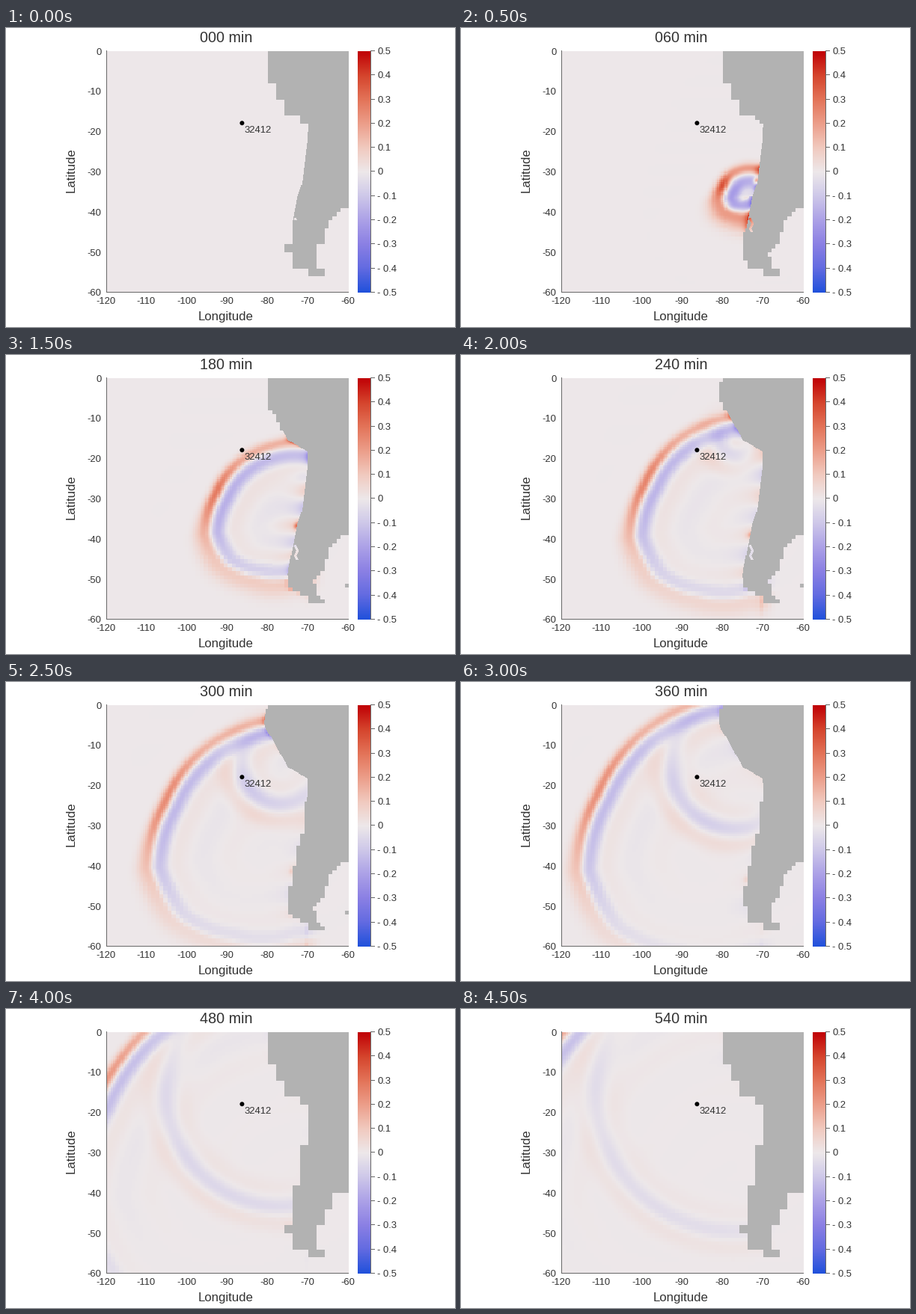
These frames come from a looping animation (600x400 px, 4750 ms). A matplotlib script:

```python
import numpy as np
import matplotlib.pyplot as plt
from matplotlib.animation import FuncAnimation
from matplotlib.colors import LinearSegmentedColormap
from matplotlib.patches import Circle

plt.rcParams["font.family"] = "Liberation Sans"
W, H, DPI = 600, 400, 100
LEFT, TOP, SIDE = 135, 31, 323
RIGHT, BOTTOM = LEFT + SIDE, TOP + SIDE
FRAMES, STEP = 19, 30  # minutes of model time per frame
PX = 72 / DPI
INK, AXIS = "#333333", "#686868"
LAND = np.array([178, 178, 178]) / 255

CMAP = LinearSegmentedColormap.from_list("sea", [
    "#2151db", "#636be1", "#8b80e4", "#aca1e7", "#cec8e9", "#ede8ea",
    "#f1cabf", "#ec9e8a", "#e37459", "#d5452d", "#c00206"], N=512)

# Key points of the two coasts as (latitude, longitude).
WEST = [(0, -80.4), (-4.5, -81), (-6, -80.6), (-7.5, -79.5), (-12, -77),
        (-15.5, -75), (-17, -72.2), (-18.2, -70.3), (-22, -70.2),
        (-29, -71.1), (-33, -71.6), (-36, -72.7), (-42, -73.9),
        (-47, -74.9), (-49, -75.2), (-53, -74.4), (-54, -70.4)]
EAST = [(-38, -59.5), (-39.5, -61.5), (-41.2, -64.2), (-44.5, -65),
        (-46, -66.6), (-47.5, -66.2), (-50.5, -68.6), (-53.5, -68),
        (-56, -66)]

CELL = 0.2
lat_axis = -CELL * (np.arange(300) + .5)
LON, LAT = np.meshgrid(-120 + CELL * (np.arange(300) + .5), lat_axis)


def bell(d, width):
    return np.exp(-.5 * (d / width) ** 2)


def sigmoid(x):
    return 1 / (1 + np.exp(-np.clip(x, -50, 50)))


def snap(v, size):
    """Centre of the grid cell that holds v."""
    return (np.floor(v / size + 1e-6) + .5) * size


def coast(points, lat):
    lats, lons = np.array(points, float).T
    return np.interp(-lat, -lats, lons)


def bands(t):
    """Limits of the refined rows: fine north/south, medium north/south."""
    if t > 450:
        return 0, 0, 0, 0
    keys = [0, 120, 240, 300, 420, 450]
    limits = ([-20, -18, -8, -1, -7, -9], [-42, -48, -50, -24, -15, -9],
              [-20, -14, 0, 0, 0, -4], [-44, -60, -60, -60, -40, -38])
    return [np.interp(t, keys, limit) for limit in limits]


def between(lat, north, south):
    return (lat < north) & (lat > south)


def land_mask(t):
    fine_n, fine_s, med_n, med_s = bands(t)
    fine = between(lat_axis, fine_n, fine_s)
    medium = between(lat_axis, med_n, med_s)
    size = np.where(fine, CELL, np.where(medium, 1, 2))

    def edge(points, size):
        return np.round(coast(points, snap(lat_axis, size)) / size) * size

    west = edge(WEST, size)[:, None]
    east = edge(EAST, np.maximum(size, 1))[:, None]
    land = (LON > west) & (LON < east) & (LAT > -56)
    # sheltered sound behind the southern islands
    sound = fine[:, None] & between(LAT, -41.4, -45.2)
    land &= ~(sound & (abs(LON + 73 - .25 * np.sin(LAT * 2.6)) < .32))
    if med_s == -60:
        land |= (LON > -61) & between(LAT, -51, -52)
    return land


def main_wave(t, lon, lat):
    dx, dy = lon + 73.5, lat + 36
    ang = np.degrees(np.arctan2(dy, -dx))  # 0 west, 90 north
    reach = np.interp(t, [0, 120, 240, 300, 420, 540],
                      [.4, 13.8, 27.7, 34.2, 46, 59.2])
    reach = reach * np.interp(ang, [-90, -55, -30, -7, 20, 75],
                              [.69, .84, 1.02, 1.075, 1, .965])
    s = np.hypot(dx, dy) - reach

    amp = min(t / 30, 1) * (.22 + .25 * np.exp(-t / 150))
    southward = sigmoid(-(ang + 15) / 9)
    fade = 1 - southward * (1 - min(1, 1.55 * np.exp(-t / 180)))
    crest = .55 + .45 * bell(ang - 22, 15)
    trough = .4 + .16 * bell(ang - 10, 40)
    width = np.where(s > 0, 1 + 1.4 * sigmoid(-(ang + 5) / 8), 1)
    wave = crest * bell(s, width) - trough * bell(s + 3.2, 1.35)
    tail = np.minimum(s + 5, 0)
    wave += .1 * np.exp(tail / 12) * np.cos(2 * np.pi * (s + 7.5) / 13.5) * (tail < 0)

    # bands along the shore, left behind by the front
    shore = coast(WEST, lat) - lon
    mid = -30 - .037 * t
    ripple = np.cos(2 * np.pi * (lat - mid) / (4 + t / 40))
    decay = min(t / 60, 1) * np.exp(-(t - 120) / 100)
    trapped = .17 * decay * ripple * np.exp(-abs(shore) / 2.5) * sigmoid(-s - 7)
    spot = .45 * min(1, decay) * bell(shore, .6) * bell(lat - mid, .6)
    wave = amp * fade * wave
    return wave * (1 + 1.3 * np.exp(-abs(shore) / .6)) + trapped + spot


def echo_wave(t, lon, lat):
    """Ring thrown back by the bend of the northern coast."""
    dx, dy = lon + 77, lat + 15
    s = np.hypot(dx, dy) - np.interp(t, [210, 300, 540], [1, 9.5, 34.5])
    amp = np.interp(t, [210, 250, 420, 540], [0, .1, .07, .04])
    side = .3 + .7 * bell(np.degrees(np.arctan2(-dy, -dx)) - 50, 50)
    return amp * side * (.55 * bell(s - 4, 1.7) - bell(s, 1.5) + .3 * bell(s + 4.5, 1.8))


def sea_level(t):
    fine_n, fine_s = bands(t)[:2]
    size = np.where(LAT < -44, 1, .5)
    size = np.where(between(LAT, fine_n, fine_s) & (LON > -79), CELL, size)
    lon, lat = snap(LON, size), snap(LAT, size)
    level = main_wave(t, lon, lat) + echo_wave(t, lon, lat)
    return level * sigmoid(-(lon + 68) * 1.5)


def picture(t):
    rgb = CMAP(np.clip(sea_level(t) + .5, 0, 1))[..., :3]
    rgb[land_mask(t)] = LAND
    return rgb


fig = plt.figure(figsize=(W / DPI, H / DPI), dpi=DPI, facecolor="white")
ax = fig.add_axes([0, 0, 1, 1])
ax.axis("off")


def label(x, y, s, px, **kw):
    return ax.text(x, y, s, fontsize=px * PX, color=INK, **kw)


def line(xs, ys):
    ax.plot(xs, ys, color=AXIS, lw=PX, solid_capstyle="butt", snap=False)


def show(rgb, x0, x1):
    return ax.imshow(rgb, extent=(x0, x1, BOTTOM, TOP),
                     interpolation="nearest", aspect="auto")


sea = show(picture(0), LEFT, RIGHT)
show(CMAP(np.linspace(1, 0, SIDE))[:, None, :3], 470, 488)
ax.set_xlim(0, W)
ax.set_ylim(H, 0)

line([LEFT - .5] * 2, [TOP - 1, BOTTOM])
line([LEFT - 1, RIGHT], [BOTTOM - .5] * 2)
line([487.5] * 2, [TOP - 1, BOTTOM])

for k in range(7):
    pos = k * SIDE / 6
    label(LEFT + pos - 1.5, 369, str(-120 + 10 * k), 13, ha="center")
    label(127.5, TOP + pos + 4.5, str(-10 * k), 13, ha="right")
for k in range(11):
    y = TOP + k * SIDE / 10
    value = 5 - k
    text = f"{abs(value) / 10:g}"
    label(496.5, y + 4, "- " + text if value < 0 else text, 13)
    line([487, 493], [round(y) - .5] * 2)

label(294, 391, "Longitude", 16.7, ha="center")
label(87, 190.5, "Latitude", 16.7, ha="center", va="center", rotation=90)
ax.add_patch(Circle((315.4, 127.2), 3, color="black", lw=0))
label(337, 140, "32412", 13, ha="center")
title = label(294, 19.3, "000 min", 19.8, ha="center")


def draw(i):
    t = i * STEP
    sea.set_data(picture(t))
    title.set_text(f"{t:03d} min")
    return sea, title


anim = FuncAnimation(fig, draw, frames=FRAMES, interval=250, repeat=True)
plt.show()
```
